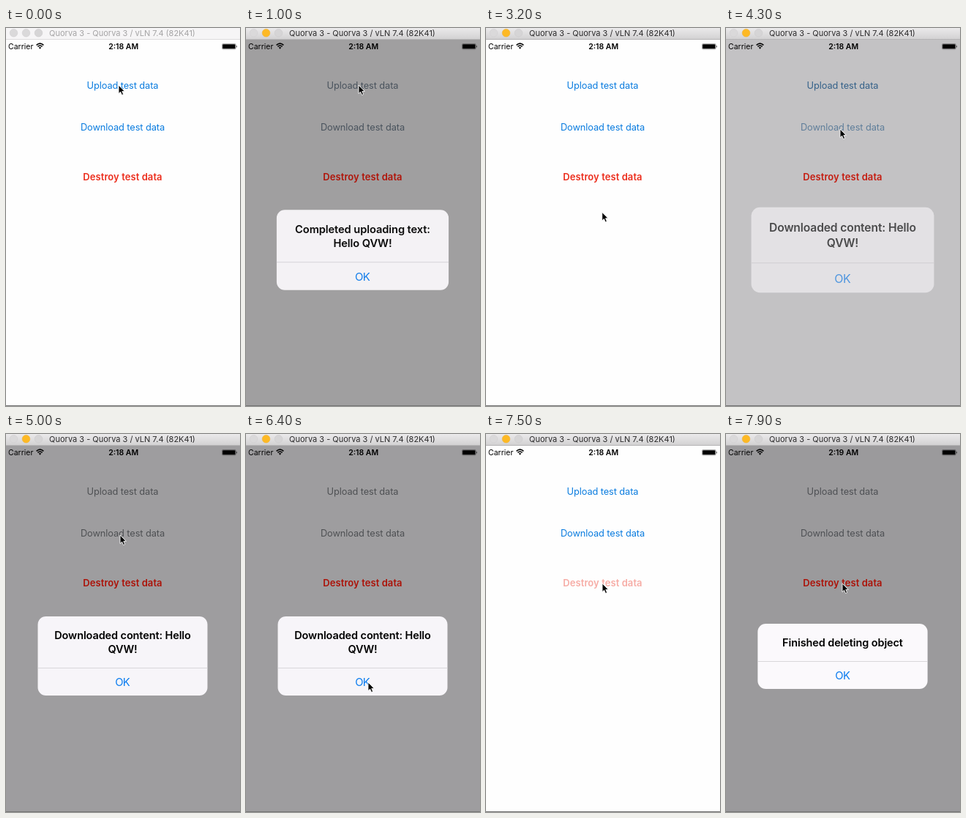
These frames come from a looping animation (320 by 516 pixels, 8000 ms). An HTML page:

```html
<!DOCTYPE html>
<html lang="en">
<head>
<meta charset="utf-8">
<title>Test data</title>
<style>
  html, body { margin: 0; width: 100%; height: 100%; overflow: hidden; background: #fefefe; }
  svg { display: block; width: 100vw; height: 100vh; }
  text { font-family: Inter, Roboto, "Liberation Sans", sans-serif; text-anchor: middle; }
  .title { font-size: 11px; }
  .status { font-size: 10.5px; }
  .button { font-size: 12.8px; letter-spacing: -.09px; }
  .heading { font-size: 14.5px; font-weight: 600; letter-spacing: -.11px; }
  .ok { font-size: 14.8px; letter-spacing: -.6px; fill: #0a7cf0; }
  .strong { font-weight: 600; }
  .button.strong { font-size: 13px; letter-spacing: .07px; }
</style>
</head>
<body>
<svg viewBox="0 0 320 516">
  <defs>
    <linearGradient id="chrome" x2="0" y2="1">
      <stop offset="0" stop-color="#ebeaeb"/>
      <stop offset="1" stop-color="#d2d1d2"/>
    </linearGradient>
  </defs>
  <rect id="screen" width="320" height="516"/>

  <rect id="bar" width="320" height="15.5"/>
  <path id="barLine" d="M0 15.5H320"/>
  <g stroke-width=".6">
    <circle cx="10.5" cy="6.7" r="5.3" fill="#dad9da" stroke="#d0cfd0"/>
    <circle id="amber" cx="27.5" cy="6.7" r="5.3"/>
    <circle cx="44.5" cy="6.7" r="5.3" fill="#d6d5d6" stroke="#cbcacb"/>
  </g>
  <text id="title" class="title" x="159" y="11">Quorva 3 - Quorva 3 / vLN 7.4 (82K41)</text>

  <text class="status" x="3" y="29" style="text-anchor:start">Carrier</text>
  <g fill="none" stroke="#000" stroke-width="1.5">
    <path d="M41.6 23.4Q46.5 18.8 51.4 23.4M43.4 25.4Q46.5 22.6 49.6 25.4"/>
    <path d="M44.7 26.6Q46.5 25.2 48.3 26.6L46.5 28.8Z" fill="#000" stroke="none"/>
  </g>
  <text id="clock" class="status strong" x="160.7" y="29"></text>
  <rect x="295.5" y="21.5" width="18.8" height="7.5" rx="1.4" fill="none" stroke="#000" stroke-opacity=".6" stroke-width=".5"/>
  <rect x="296.2" y="22.2" width="17.4" height="6.1" rx=".8"/>
  <path d="M315 23.6Q316.6 25.2 315 26.9Z"/>

  <g id="buttons"></g>
  <g id="alert">
    <rect id="panel" x="43.5" width="232" rx="11"/>
    <g id="heading"></g>
    <path id="divider" stroke="#d2d0d4" stroke-width=".8"/>
    <text id="ok" class="ok" x="159.2">OK</text>
  </g>
  <path d="M0 515.5H320" stroke="#757575"/>
  <path id="cursor" d="M0 0V11.6L2.6 9.2L4.5 13.5L6.6 12.6L4.8 8.4H8.3Z"
        fill="#000" stroke="#fff" stroke-width=".9" stroke-linejoin="round"/>
</svg>
<script>
const LOOP = 8000;
const FADE = 470;
const $ = id => document.getElementById(id);
const WHITE = [254, 254, 254], BLUE = [10, 124, 223], GREY = [78, 80, 83];
const RED = [236, 45, 28], DARK_RED = [172, 18, 8];

const buttons = [
  { label: 'Upload test data', y: 83, from: BLUE, to: GREY, down: 100, up: 270 },
  { label: 'Download test data', y: 140, from: BLUE, to: GREY, down: 3860, up: 4010 },
  { label: 'Destroy test data', y: 208, from: RED, to: DARK_RED, down: 7300, up: 7390, strong: true }
];
const alerts = [
  { open: 810, close: 2485, lines: ['Completed uploading text:', 'Hello QVW!'], dim: [153, 152, 153], fill: '#fbf9fc' },
  { open: 4210, close: 6460, lines: ['Downloaded content: Hello', 'QVW!'], dim: [158, 157, 159], fill: '#f7f5f9' },
  { open: 7585, close: Infinity, lines: ['Finished deleting object'], dim: [154, 153, 155], fill: '#fcfafd' }
];
// Each move: start, end, destination x and y
const start = [154, 78];
const moves = [
  [1500, 2250, 161, 345],
  [2850, 3600, 156, 138],
  [5600, 6250, 167, 339],
  [6600, 7200, 159, 204]
];

const clamp = v => Math.min(1, Math.max(0, v));
const smooth = v => v * v * (3 - 2 * v);
const mix = (a, b, k) => a + (b - a) * k;
const blend = (a, b, k) => a.map((v, i) => mix(v, b[i], k));
const rgb = c => `rgb(${c.map(Math.round)})`;
const set = (el, attrs) => { for (const k in attrs) el.setAttribute(k, attrs[k]); };

// Critically damped spring from 0 to 1
function spring(ms) {
  const x = Math.max(0, ms) * 0.0228;
  return 1 - (1 + x) * Math.exp(-x);
}

function addText(parent, content, y, className) {
  const el = document.createElementNS('http://www.w3.org/2000/svg', 'text');
  set(el, { x: 159.5, y, class: className });
  el.textContent = content;
  parent.append(el);
  return el;
}

for (const b of buttons) b.el = addText($('buttons'), b.label, b.y, b.strong ? 'button strong' : 'button');

function pressAlpha(t, { down, up }) {
  return t < down ? 1 : mix(0.2, 1, clamp((t - up) / FADE));
}

function cursorAt(t) {
  return moves.reduce((p, [a, b, x, y]) => blend(p, [x, y], smooth(clamp((t - a) / (b - a)))), start);
}

let shown;
function layoutAlert(a) {
  if (a === shown) return;
  shown = a;
  const single = a.lines.length === 1;
  const top = single ? 259 : 249;
  const height = single ? 89 : 108;
  set($('panel'), { y: top, height, fill: a.fill });
  set($('divider'), { d: `M43.5 ${top + height - 37.5}h232` });
  set($('ok'), { y: top + height - 12.6 });
  $('heading').replaceChildren();
  a.lines.forEach((line, i) => addText($('heading'), line, top + 31 + i * 19, 'heading'));
}

function drawWindow(active) {
  set($('bar'), { fill: active ? 'url(#chrome)' : '#f6f5f6' });
  set($('barLine'), { stroke: active ? '#b5b4b5' : '#dcdbdc' });
  set($('amber'), active ? { fill: '#fdb924', stroke: '#f0b030' } : { fill: '#dad9da', stroke: '#d0cfd0' });
  set($('title'), { fill: active ? '#2c2b2c' : '#a5a4a5' });
}

function render(t) {
  const a = alerts.filter(item => t >= item.open).pop() || alerts[0];
  const opened = spring(t - a.open);
  const level = opened * (1 - spring(t - a.close));

  drawWindow(t >= 100);
  $('clock').textContent = t < 7700 ? '2:18 AM' : '2:19 AM';
  set($('screen'), { fill: rgb(blend(WHITE, a.dim, level)) });
  for (const b of buttons) {
    set(b.el, { fill: rgb(blend(b.from, b.to, level)), opacity: pressAlpha(t, b) });
  }

  layoutAlert(a);
  const scale = mix(1.2, 1, opened);
  set($('alert'), {
    opacity: level,
    transform: `translate(159.5 303.2) scale(${scale}) translate(-159.5 -303.2)`
  });
  set($('cursor'), { transform: `translate(${cursorAt(t)})` });
}

function tick() {
  render(performance.now() % LOOP);
  requestAnimationFrame(tick);
}
tick();
</script>
</body>
</html>
```
